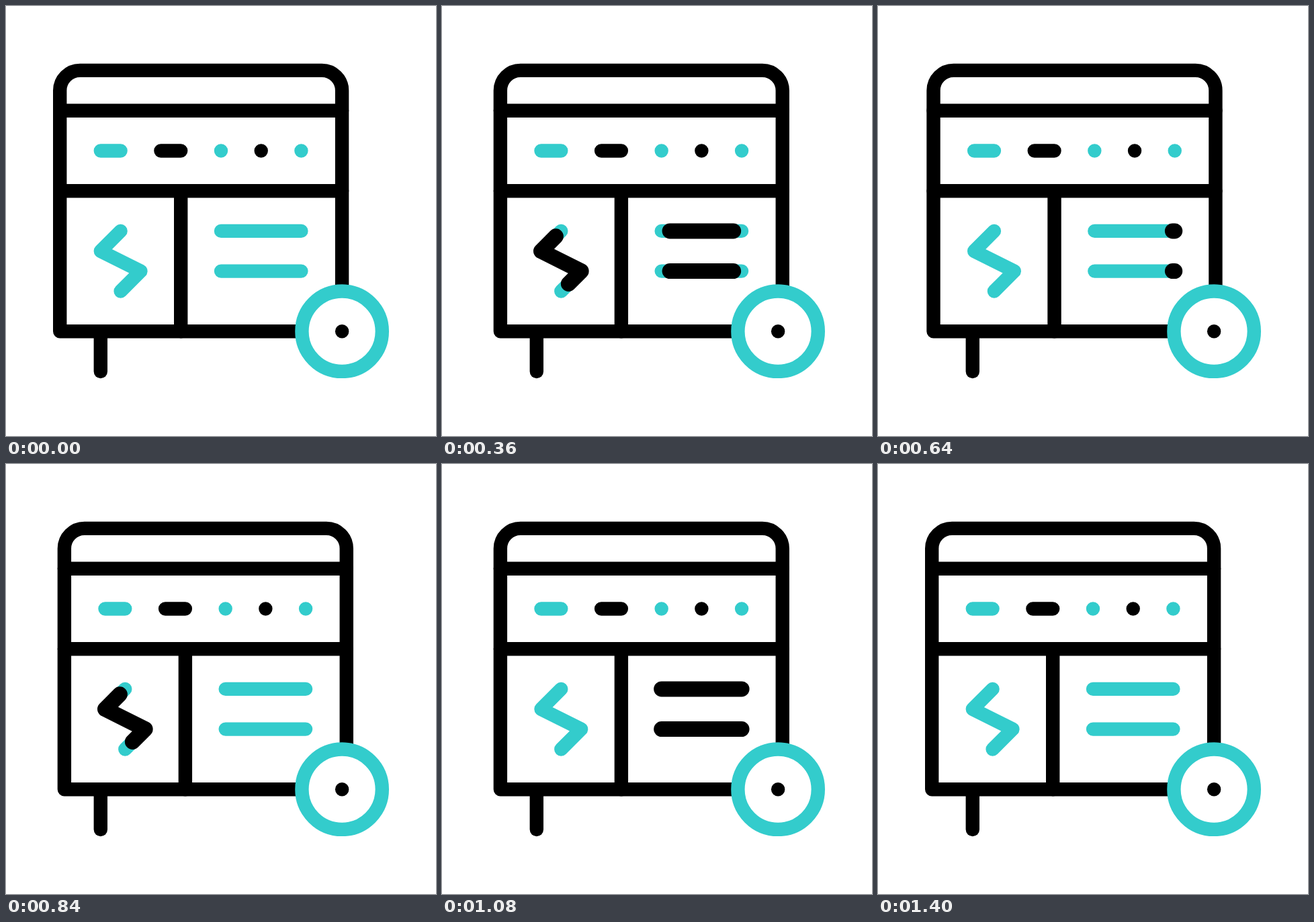
Recreate the animation shown at these times as an HTML page. Size 640 by 640 pixels, loop 1.48 s.

```html
<!DOCTYPE html>
<html lang="en">
<head>
<meta charset="utf-8">
<title>Generator</title>
<style>
html, body { margin: 0; width: 100%; height: 100%; overflow: hidden; background: #fff; }
svg { display: block; width: 100%; height: 100%; }
path, circle { fill: none; stroke: #000; stroke-width: 20.4; stroke-linecap: round; stroke-linejoin: round; }
.teal { stroke: #3cc; }
.glow { stroke-width: 23; }
#wheel { fill: #fff; }
</style>
</head>
<body>
<svg viewBox="0 0 640 640">
  <path id="leg" d="M140.8 484.2V544"/>
  <g id="body">
    <path d="M80.2 484.2V125.8a29.9 29.9 0 0 1 29.9-29.9H470.2a29.9 29.9 0 0 1 29.9 29.9V484.2Z"/>
    <path d="M80.2 155.8H500.1M80.2 275.2H500.1M260.2 275.2V484.2"/>
    <path class="teal" d="M140.8 215.5H170.6M320 215.5h.01M439.4 215.5h.01"/>
    <path d="M230.4 215.5H260.2M379.7 215.5h.01"/>
    <path class="teal" d="M170.6 334.9L140.8 364.8L200.5 394.6L170.6 424.5"/>
    <path class="teal" d="M320 334.9H439.4M320 394.6H439.4"/>
    <path class="glow bolt" pathLength="1" d="M170.6 334.9L140.8 364.8L200.5 394.6L170.6 424.5"/>
    <path class="glow bar" pathLength="1" d="M320 334.9H439.4"/>
    <path class="glow bar" pathLength="1" d="M320 394.6H439.4"/>
  </g>
  <circle id="wheel" class="teal" cx="500.1" cy="484.2" r="59.7"/>
  <path d="M500.1 484.2h.01"/>
</svg>
<script>
const STEP = 40, LOOP = 1480;
const $ = s => document.querySelector(s);
const body = $('#body'), leg = $('#leg'), wheel = $('#wheel');
const bolts = document.querySelectorAll('.bolt');
const bars = document.querySelectorAll('.bar');

// Eased progress from 0 to 1 between steps a and b
const ease = (n, a, b) => {
  const u = Math.min(1, Math.max(0, (n - a) / (b - a)));
  return u * u * (3 - 2 * u);
};
const pulse = (n, a, half) => ease(n, a, a + half) - ease(n, a + half, a + 2 * half);

function trim(paths, start, end) {
  const shown = end > start;
  for (const p of paths) {
    p.style.display = shown ? '' : 'none';
    if (shown) {
      p.style.strokeDasharray = `${end - start} 3`;
      p.style.strokeDashoffset = -start;
    }
  }
}

function draw(n) {
  const shake = n >= 5 && n < 35 ? 9 * pulse((n - 5) % 6, 0, 3) : 0;
  body.setAttribute('transform', `translate(${shake} 0)`);

  const kick = pulse(n, 1, 2);
  leg.setAttribute('d', `M140.8 484.2V${544 + 9 * kick}`);
  wheel.setAttribute('r', 59.7 * (1 + 0.1 * kick));

  const b = n < 16 ? n : n - 12;
  trim(bolts, ease(b, 8, 14), ease(b, 5, 10));

  if (n < 19) trim(bars, ease(n, 7, 17), ease(n, 1, 11));
  else trim(bars, ease(n, 27, 32), ease(n, 22, 27));
}

const t0 = performance.now();
function tick() {
  draw(Math.floor(((performance.now() - t0) % LOOP) / STEP));
  requestAnimationFrame(tick);
}
tick();
</script>
</body>
</html>
```
